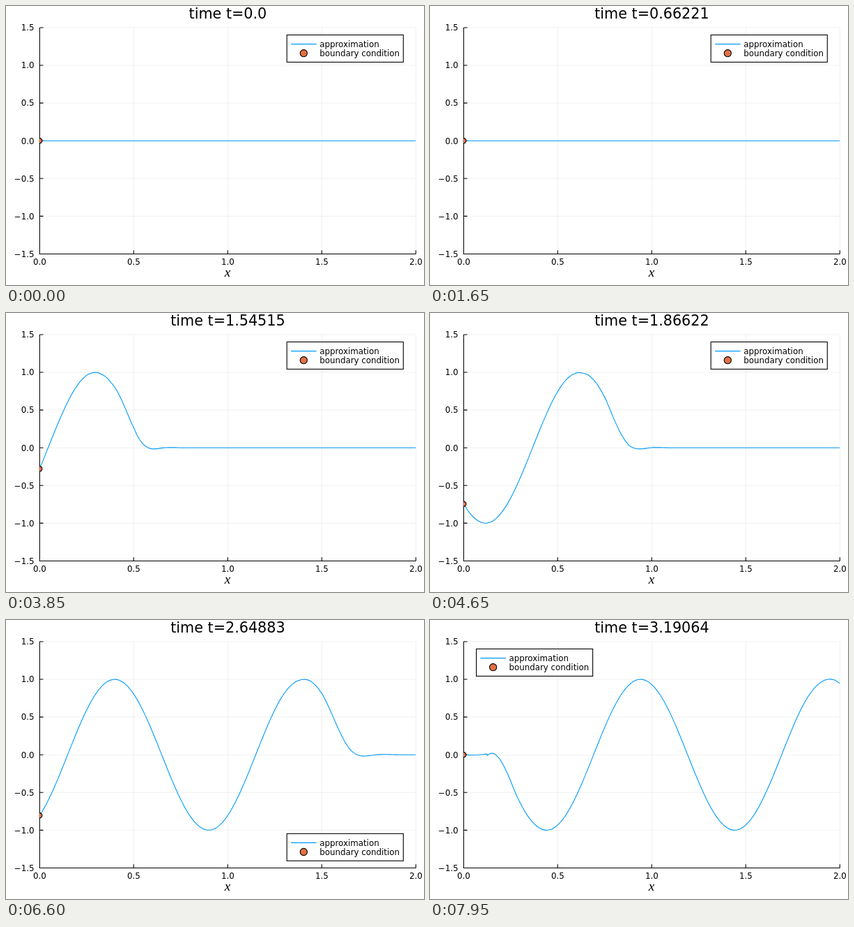
An HTML page for the animation above (8000 ms loop, 600 px wide and 400 px high).

```html
<!DOCTYPE html>
<html lang="en">
<head>
<meta charset="utf-8">
<title>Advection</title>
<style>
  html, body { margin: 0; width: 100%; height: 100%; overflow: hidden; background: #fff; }
  svg { display: block; width: 600px; height: 400px; }
  text { font-family: "DejaVu Sans", sans-serif; font-size: 11.83px; fill: #000; }
  .mid { text-anchor: middle; }
  .end { text-anchor: end; }
  .title { font-size: 20.7px; }
  .math { font-family: "Liberation Serif", serif; font-style: italic; font-size: 19px; }
  .grid { stroke: #000; stroke-opacity: .1; stroke-width: .6; fill: none; }
  .axis { stroke: #000; stroke-width: 1.1; fill: none; }
  .wave { stroke: #009afa; stroke-width: 1.1; fill: none; stroke-linejoin: round; }
  .dot { fill: #e26f46; stroke: #000; stroke-width: 1.1; }
</style>
</head>
<body>
<svg viewBox="0 0 600 400">
  <defs><clipPath id="area"><rect x="48" y="30.8" width="540.6" height="325"/></clipPath></defs>
  <rect width="600" height="400" fill="#fff"/>
  <path id="grid" class="grid"/>
  <path id="axis" class="axis"/>
  <g id="labels"></g>
  <text class="mid math" x="318" y="388.3">x</text>
  <text id="title" class="mid title" x="318.4" y="18"></text>
  <g clip-path="url(#area)">
    <path id="wave" class="wave"/>
    <circle id="dot" class="dot" r="3.6"/>
  </g>
  <g id="legend">
    <rect x="403.2" y="41.5" width="167.1" height="39" fill="#fff" stroke="#000" stroke-width="1.1"/>
    <path class="wave" d="M409 54.6H445.6"/>
    <circle class="dot" cx="427.3" cy="67.7" r="5.1"/>
    <text x="450.2" y="59">approximation</text>
    <text x="450.2" y="72.2">boundary condition</text>
  </g>
</svg>
<script>
const $ = id => document.getElementById(id);
const FRAMES = 160, FRAME_MS = 50, DT = 6 / 299;
const CELLS = 16, H = 2 / CELLS, SUB = 20, PIECES = 8;
const px = x => 48.3 + 270 * x;
const py = u => 193.2 - 108.15 * u;
const inflow = t => t >= 1 && t <= 3 ? Math.sin(2 * Math.PI * t) : 0;

// u_t + u_x = 0: upwind discontinuous Galerkin, cubic Legendre modes per cell,
// the top mode weighted as in Lobatto quadrature.
function rate(a, t) {
  const out = [];
  let left = inflow(t);
  for (let c = 0; c < CELLS; c++) {
    const [p, q, r, s] = a.slice(4 * c, 4 * c + 4);
    const right = p + q + r + s;
    out.push(
      (left - right) / H,
      3 * (-left - right + 2 * p) / H,
      5 * (left - right + 2 * q) / H,
      3 * (-left - right + 2 * p + 2 * r) / H
    );
    left = right;
  }
  return out;
}

const axpy = (a, k, h) => a.map((v, i) => v + h * k[i]);

function rk4(a, t, h) {
  const k1 = rate(a, t);
  const k2 = rate(axpy(a, k1, h / 2), t + h / 2);
  const k3 = rate(axpy(a, k2, h / 2), t + h / 2);
  const k4 = rate(axpy(a, k3, h), t + h);
  return a.map((v, i) => v + h / 6 * (k1[i] + 2 * k2[i] + 2 * k3[i] + k4[i]));
}

function wavePath(a) {
  const pts = [];
  for (let c = 0; c < CELLS; c++) {
    const [p, q, r, s] = a.slice(4 * c, 4 * c + 4);
    for (let j = 0; j <= PIECES; j++) {
      const z = 2 * j / PIECES - 1;
      const u = p + q * z + r * (1.5 * z * z - .5) + s * (2.5 * z * z - 1.5) * z;
      pts.push(px((c + j / PIECES) * H).toFixed(2) + " " + py(u).toFixed(2));
    }
  }
  return "M" + pts.join("L");
}

const waves = [];
let state = new Array(4 * CELLS).fill(0);
for (let k = 0; k < FRAMES; k++) {
  waves.push(wavePath(state));
  for (let j = 0; j < SUB; j++) state = rk4(state, (k + j / SUB) * DT, DT / SUB);
}

function buildAxes() {
  const x0 = px(0), x1 = px(2), y0 = py(-1.5), y1 = py(1.5);
  let grid = "", axis = `M${x0} ${y1}V${y0}H${x1}`, labels = "";
  for (let i = 0; i <= 4; i++) {
    const x = px(i / 2);
    grid += `M${x} ${y0}V${y1}`;
    axis += `M${x} ${y0}v-5.2`;
    labels += `<text class="mid" x="${x}" y="371.3">${(i / 2).toFixed(1)}</text>`;
  }
  for (let i = -3; i <= 3; i++) {
    const y = py(i / 2);
    grid += `M${x0} ${y}H${x1}`;
    axis += `M${x0} ${y}h5.2`;
    const label = (i < 0 ? "\u2212" : "") + Math.abs(i / 2).toFixed(1);
    labels += `<text class="end" x="40.6" y="${y + 4.3}">${label}</text>`;
  }
  $("grid").setAttribute("d", grid);
  $("axis").setAttribute("d", axis);
  $("labels").innerHTML = labels;
}

function legendShift(k) {
  if (k < 124) return "0 0";
  return k < 149 ? "0 264.8" : "-336.7 0";
}

function draw(k) {
  const t = k * DT;
  $("title").textContent = "time t=" + (k ? Number(t.toFixed(5)) : "0.0");
  $("wave").setAttribute("d", waves[k]);
  $("dot").setAttribute("cx", px(0));
  $("dot").setAttribute("cy", py(inflow(t)));
  $("legend").setAttribute("transform", `translate(${legendShift(k)})`);
}

buildAxes();
draw(0);
const start = performance.now();
let shown = 0;
function tick() {
  const k = Math.floor((performance.now() - start) / FRAME_MS) % FRAMES;
  if (k !== shown) draw(shown = k);
  requestAnimationFrame(tick);
}
requestAnimationFrame(tick);
</script>
</body>
</html>
```
